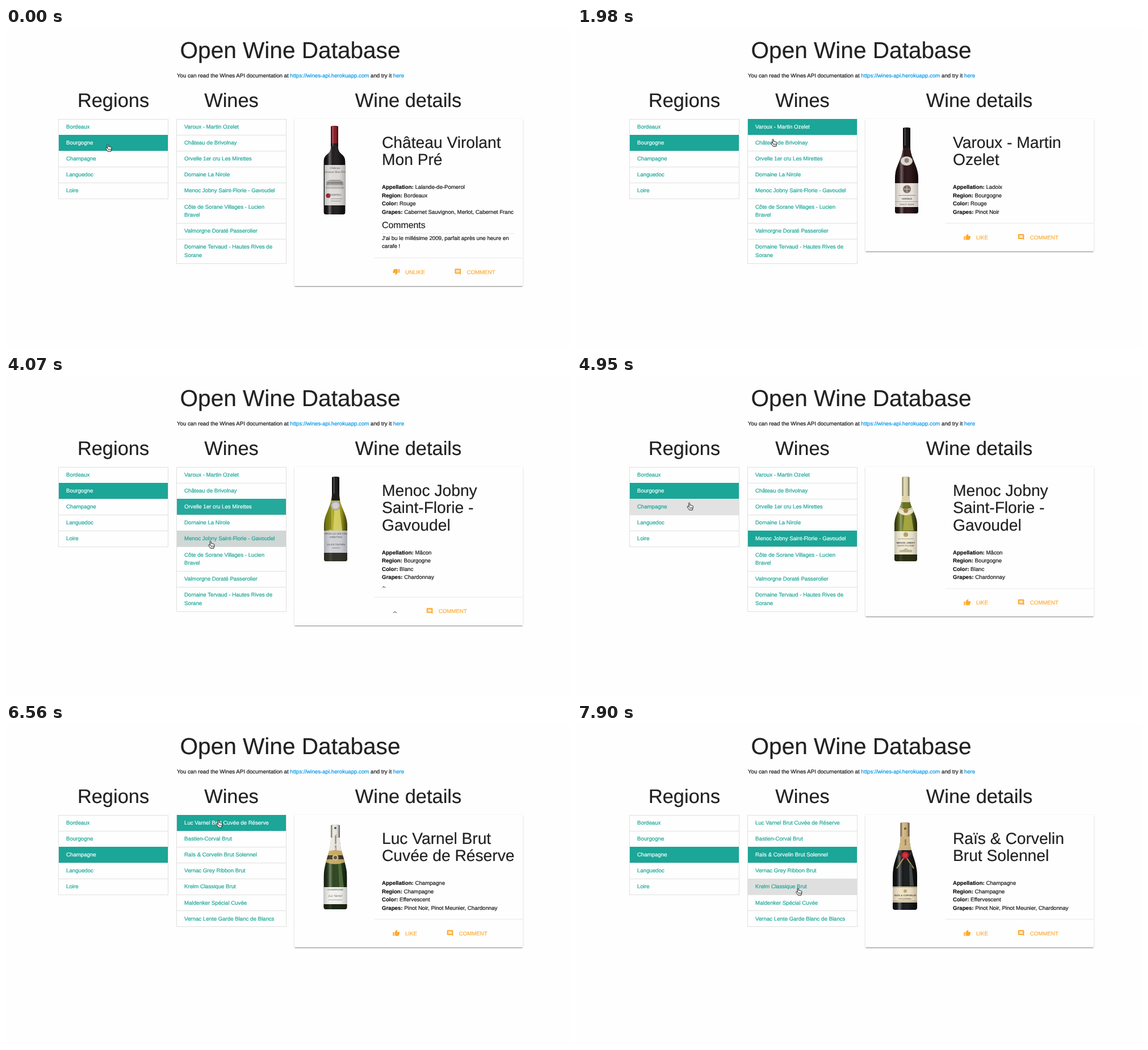
An HTML page for the animation above (8 s loop, 995 by 563 pixels).

```html
<!DOCTYPE html>
<html lang="en">
<head>
<meta charset="utf-8">
<title>Open Wine Database</title>
<style>
html, body { margin: 0; width: 100%; height: 100%; overflow: hidden; background: #fefefe; }
#card {
  position: absolute; left: 508px; top: 160px; width: 401.5px; border-radius: 1.3px; background: #fefefe;
  box-shadow: 0 1.3px 1.3px rgba(0,0,0,.16), 0 .7px 3.3px rgba(0,0,0,.14), 0 2px .7px -1.3px rgba(0,0,0,.22);
}
svg { position: absolute; left: 0; top: 0; }
text {
  font: 9.67px "Liberation Sans", Arial, sans-serif; text-rendering: geometricPrecision; color: #161616;
  fill: currentColor; stroke: currentColor; stroke-width: .2px;
}
.h1 { font-size: 40.6px; text-anchor: middle; }
.h2 { font-size: 34.4px; text-anchor: middle; }
.h3 { font-size: 28.2px; }
.h5 { font-size: 15.86px; }
.h1, .h2, .h3, .h5 { color: #212121; }
.teal { color: #1aa596; }
.white { color: #fff; }
.link { color: #0396e8; }
.amber { color: #ffa92f; }
.tiny { font-size: 4.4px; text-anchor: middle; stroke: none; color: #55504a; }
.script { font: italic 5.5px "Liberation Serif", serif; }
.b { font-weight: 700; }
</style>
</head>
<body>
<div id="card"></div>
<svg width="995" height="563" viewBox="0 0 995 563">
  <defs>
    <linearGradient id="sheen">
      <stop offset="0" stop-color="#000" stop-opacity=".6"/>
      <stop offset=".16" stop-color="#000" stop-opacity=".15"/>
      <stop offset=".27" stop-color="#fff" stop-opacity=".3"/>
      <stop offset=".4" stop-color="#fff" stop-opacity="0"/>
      <stop offset=".75" stop-color="#000" stop-opacity=".1"/>
      <stop offset="1" stop-color="#000" stop-opacity=".65"/>
    </linearGradient>
  </defs>
  <text class="h1" x="500.5" y="52.8">Open Wine Database</text>
  <text x="301" y="87.2">You can read the Wines API documentation at <tspan class="link">https://wines-api.herokuapp.com</tspan> and try it <tspan class="link">here</tspan></text>
  <text class="h2" x="189" y="138.6">Regions</text>
  <text class="h2" x="397" y="138.6">Wines</text>
  <text class="h2" x="708.5" y="138.6">Wine details</text>
  <g id="lists"></g>
  <g id="photo"></g>
  <g id="details"></g>
  <g id="hand" stroke="#111" stroke-width=".95" stroke-linejoin="round" stroke-linecap="round">
    <path fill="#fff" d="M-3-5.4C-3-6.9-1-6.9-.9-5.4L-.6-2C-.2-2.9 1-2.7 1.2-1.7 1.6-2.4 2.8-2.1 3-1.2 3.7-1.7 5-1.3 5 0L4.6 3 3.7 6.3H-1.6L-4.9 1.6C-6 .2-4.7-1-3.5 0L-2.4 1.1Z"/>
    <path fill="none" stroke-width=".7" d="M-.6 1.5V4M1.2 1.5V4M3 1.5V4"/>
  </g>
</svg>
<script>
const TEAL = '#1ba698', GREY = '#ddd', LINE = '#e0e0e0', ROW = 28.07;
const $ = id => document.getElementById(id);

const regions = ['Bordeaux', 'Bourgogne', 'Champagne', 'Languedoc', 'Loire'];
const cellars = [
  ['Varoux - Martin Ozelet', 'Château de Brivolnay', 'Orvelle 1er cru Les Mirettes', 'Domaine La Nirole',
   'Menoc Jobny Saint-Florie - Gavoudel', 'Côte de Sorane Villages - Lucien|Bravel',
   'Valmorgne Doraté Passerolier', 'Domaine Tervaud - Hautes Rives de|Sorane'],
  ['Luc Varnel Brut Cuvée de Réserve', 'Bastien-Corval Brut', 'Raïs & Corvelin Brut Solennel',
   'Vernac Grey Ribbon Brut', 'Krelm Classique Brut', 'Maldenker Spécial Cuvée',
   'Vernac Lente Garde Blanc de Blancs']
];

const wine = (title, Appellation, Region, Color, Grapes, note) => ({ title, facts: { Appellation, Region, Color, Grapes }, note });
const bubbly = title => wine(title, 'Champagne', 'Champagne', 'Effervescent', 'Pinot Noir, Pinot Meunier, Chardonnay');
const wines = [
  wine('Château Virolant|Mon Pré', 'Lalande-de-Pomerol', 'Bordeaux', 'Rouge', 'Cabernet Sauvignon, Merlot, Cabernet Franc',
    ["J'ai bu le millésime 2009, parfait après une heure en", 'carafe !']),
  wine('Varoux - Martin|Ozelet', 'Ladoix', 'Bourgogne', 'Rouge', 'Pinot Noir'),
  wine('Orvelle 1er cru|Les Mirettes', 'Chablis', 'Bourgogne', 'Blanc', 'Chardonnay'),
  wine('Menoc Jobny|Saint-Florie -|Gavoudel', 'Mâcon', 'Bourgogne', 'Blanc', 'Chardonnay'),
  bubbly('Luc Varnel Brut|Cuvée de Réserve'),
  bubbly('Raïs & Corvelin|Brut Solennel')
];

const safe = s => s.replace(/&/g, '&amp;');
const text = (x, y, s, cls = '') => `<text class="${cls}" x="${x}" y="${y}">${s}</text>`;
const rect = (x, y, w, h, fill, more = '') => `<rect x="${x}" y="${y}" width="${w}" height="${h}" fill="${fill}" ${more}/>`;
const disc = (x, y, r, fill, ry = r) => `<ellipse cx="${x}" cy="${y}" rx="${r}" ry="${ry}" fill="${fill}"/>`;
const path = (d, fill, more = '') => `<path d="${d}" fill="${fill}" ${more}/>`;

// Bottle outline: neck half-width n, body half-width w, shoulders between y1 and y2
function bottle(cx, n, w, top, y1, y2, end, glass, parts, curve = .4) {
  const k = (y2 - y1) * curve, l = cx - w, r = cx + w;
  const d = `M${cx - n} ${top + 1}Q${cx} ${top - 1} ${cx + n} ${top + 1}V${y1}C${cx + n} ${y1 + k} ${r} ${y2 - k} ${r} ${y2}V${end - 4}Q${r} ${end} ${r - 4} ${end}H${l + 4}Q${l} ${end} ${l} ${end - 4}V${y2}C${l} ${y2 - k} ${cx - n} ${y1 + k} ${cx - n} ${y1}Z`;
  const shade = o => rect(l, y1, 2 * w, end - y1, 'url(#sheen)', `opacity="${o}"`);
  return `<clipPath id="glass"><path d="${d}"/></clipPath><g clip-path="url(#glass)">` + path(d, glass) + shade(.9) + parts +
    rect(cx - n, top, 2 * n, y1 - top, 'url(#sheen)') + shade(.3) + '</g>';
}

const bottles = [
  () => bottle(578.5, 6.5, 19, 172, 208, 236, 328, '#211d20',
    rect(571, 172, 15, 31, '#8c1f2b') + rect(561, 241, 36, 71, '#dedcda') +
    text(579, 248, 'Château', 'tiny script') + text(579, 255, 'Virolant Mon Pré', 'tiny script') +
    path('M564 277V271L570 267H588L594 271V277Z', '#a4a19f') + rect(566, 272, 26, 1, '#555') +
    rect(563, 279, 32, 4, '#bbb8b5') + text(580, 295, 'POMEROL', 'tiny') +
    rect(572, 300, 20, .8, '#888') + rect(572, 304, 18, .8, '#888') + disc(567.5, 295, 4, '#9c2633'), .6),
  () => bottle(580.5, 6.5, 20.5, 175, 207, 264, 326.5, '#2c1718',
    rect(570, 175, 20, 36, '#171416') + disc(580.5, 234, 10.5, '#dcd6cc', 8) + disc(580.5, 233, 4, '#8d8780') +
    rect(560, 273, 41, 42, '#ebe6df') + disc(581, 283.5, 7, '#7f6d64') +
    path('M575 283.5H587M581 277.5V289.5', 'none', 'stroke="#d9cfc4"') +
    rect(566, 294, 30, .8, '#a58') + text(581, 302, 'VAROUX', 'tiny b') + rect(560, 305, 41, 1, '#c9a28e') +
    text(581, 311.5, 'PINOT NOIR', 'tiny')),
  () => bottle(580.5, 6.5, 20.5, 177, 207, 264, 326, '#aaa51f',
    path('M562 250Q572 225 573 205V270H562Z', '#7f800f') + path('M579 220H586L592 272H576Z', '#d3cf62') +
    rect(570, 176, 21, 43, '#1b1b1c') + disc(580.5, 228, 8.5, '#a9a9a6') + disc(580.5, 228, 6, '#d0d0ce') +
    rect(560, 272, 41, 39, '#ced0d6') + text(581, 279, 'ORVELLE 1ER CRU', 'tiny') + text(581, 285, 'MIRETTES', 'tiny') +
    text(581, 298, 'JULES TAVORN', 'tiny') + rect(574, 302, 14, .8, '#777') + rect(560, 311, 41, 15, '#33332b')),
  () => bottle(579, 6.5, 20, 177, 211, 262, 326, '#66711f',
    path('M577 240H588L593 272H574Z', '#a3a640') + rect(568, 176, 22, 46, '#ddd4aa') +
    path('M564 228Q579 240 594 228L592 240Q579 250 566 240Z', '#ece4cc') +
    path('M565 231Q579 242 593 231', 'none', 'stroke="#b69c4d" stroke-width="1"') + disc(579, 237, 4, '#a9854a') +
    rect(559, 273, 40, 41, '#eee8d3') + disc(579, 279, 4, '#b5a265') + rect(565, 286, 28, .7, '#8b846d') +
    text(579, 295, 'MENOC JOBNY', 'tiny b') + text(579, 300, 'SAINT-FLORIE', 'tiny') +
    path('M568 310V306H574L579 303 584 306H590V310Z', '#c1b694') + rect(559, 314, 40, 12, '#2c3012')),
  () => bottle(580, 8, 20.5, 177, 200, 270, 326, '#2e4521',
    path('M585 246H590L595 287H587Z', '#4f6b3a') + rect(566, 176, 28, 52, '#e9e7e0') +
    `<g transform="rotate(-90 580 208)">${text(580, 210, 'LUC VARNEL', 'tiny b')}</g>` + disc(580, 183, 2, '#555') +
    path('M562 226Q580 218 598 226V243Q580 250 562 243Z', '#c7ab66') + rect(562, 231, 36, 7, '#39382c') +
    disc(580, 235, 5.5, '#d3bd82') + disc(580, 235, 3, '#665638') +
    rect(559, 287, 42, 31, '#f1f1ed') + text(580, 293, 'CHAMPAGNE', 'tiny') + text(580, 304, 'Luc Varnel', 'tiny script') +
    rect(568, 309, 24, .7, '#888') + rect(559, 317, 42, 9, '#1c2616')),
  () => bottle(577.5, 8, 21.5, 173, 198, 267, 327, '#171b1b',
    rect(565, 172, 26, 50, '#cfb381') + `<g transform="rotate(-90 578 208)">${text(578, 210, 'RAÏS', 'tiny b')}</g>` +
    disc(578, 184, 2, '#6d5527') +
    path('M566 223Q578 234 590 222L592 228Q578 238 564 229Z', '#2a2a28') +
    path('M563 254L578 232 593 254', 'none', 'stroke="#b99a55" stroke-width="2"') + disc(578, 231, 6.5, '#b31c2b') +
    disc(578, 231, 4, '#cf3340') + path('M585 247H589L593 285H586Z', '#454b49') +
    rect(556, 286, 43, 28, '#eee3c5') + rect(556, 287, 43, 1, '#bda05e') + rect(556, 311, 43, 1.2, '#bda05e') +
    disc(578, 294, 3, '#c4a76a') + text(578, 303, 'RAÏS &amp; CORVELIN', 'tiny b') + text(578, 309, 'SOLENNEL', 'tiny'))
];

const THUMB = 'M1 21h4V9H1v12zm22-11c0-1.1-.9-2-2-2h-6.31l.95-4.57.03-.32c0-.41-.17-.79-.44-1.06L14.17 1 7.59 7.59C7.22 7.95 7 8.45 7 9v10c0 1.1.9 2 2 2h9c.83 0 1.54-.5 1.84-1.22l3.02-7.05c.09-.23.14-.47.14-.73v-2z';
const BUBBLE = 'M20 2H4c-1.1 0-2 .9-2 2v12c0 1.1.9 2 2 2h14l4 4V4c0-1.1-.9-2-2-2zm-2 12H6v-2h12v2zm0-3H6V9h12v2zm0-3H6V6h12v2z';
const icon = (d, x, y, turn = 0) => path(d, '#ffa92f', `transform="translate(${x} ${y}) scale(.535) rotate(${turn} 12 12)"`);
const dots = (x, y) => disc(x - 2.5, y + .5, .6, '#222') + disc(x, y - .5, .9, '#111') + disc(x + 2.5, y + .5, .7, '#222');

// Borders and fills sit on whole pixels; a coloured row covers its upper border
function list(x, names, fills, picked) {
  let y = 160, lines = '', rows = '', words = '';
  names.forEach((name, i) => {
    const parts = name.split('|'), next = y + ROW + 14.5 * (parts.length - 1), top = Math.round(y);
    lines += rect(x, top, 192, 1, LINE);
    if (fills[i]) rows += rect(x, top, 192, Math.round(next) - top, fills[i]);
    parts.forEach((s, j) => words += text(x + 13.1, y + 17.2 + 14.5 * j, safe(s), i === picked ? 'white' : 'teal'));
    y = next;
  });
  const end = Math.round(y);
  lines += rect(x, end, 192, 1, LINE) + rect(x - 1, 160, 1, end - 159, LINE) + rect(x + 192, 160, 1, end - 159, LINE);
  return lines + rows + words;
}

function details({ title, facts, note }, loading) {
  const lines = title.split('|'), d = 30.5 * (lines.length - 2);
  let out = '', y = 283.2 + d, edge = 343.5 + d;
  lines.forEach((s, i) => out += text(662, 210.6 + 30.5 * i, safe(s), 'h3'));
  for (const key in facts) {
    out += text(662, y, `<tspan class="b">${key}:</tspan> ${facts[key]}`);
    y += 14.45;
  }
  if (loading) {
    out += dots(665.3, 341 + d);
    edge += 15.2;
  } else if (note) {
    out += text(662, 352, 'Comments', 'h5') + rect(661.5, 361.5, 234.5, .7, LINE);
    note.forEach((s, i) => out += text(662, 373 + 14.4 * i, s));
    edge = 404.5;
  }
  const base = edge + 28, top = edge + 18;
  const chat = loading ? 739.6 : note ? 789.3 : 775.6;
  out += rect(649, edge - .3, 260.5, .7, LINE);
  out += loading ? dots(685, edge + 26.5)
    : icon(THUMB, 680.8, top, note ? 180 : 0) + text(703, base, note ? 'UNLIKE' : 'LIKE', 'amber');
  out += icon(BUBBLE, chat, top) + text(chat + 22.2, base, 'COMMENT', 'amber');
  $('card').style.height = edge + 49.3 - 160 + 'px';
  return out;
}

// Timeline: each step overrides parts of the state before it
const steps = [];
const at = (t, x, y, more) => steps.push({ t, x, y, ...more });
function choose(t, dt, x, y, old, next, show) {
  at(t, x, y, { fills: { [old]: '#25a99c', [next]: '#d0d7d5' }, show, loading: true });
  at(t + dt, x, y, { fills: { [old]: '#e4f4f2', [next]: '#2bab9e' }, picked: next, photo: show });
  at(t + 2 * dt, x, y, { fills: { [next]: TEAL }, loading: false });
}
const hover = (picked, i, c = GREY) => ({ fills: { [i]: c, [picked]: TEAL } });

at(0, 181, 211, { region: { 1: TEAL }, home: 1, cellar: 0, fills: {}, picked: -1, show: 0, photo: 0, loading: false });
at(450, 205, 209);
at(617, 268, 199);
at(783, 324, 190, { fills: { 0: '#eee' } });
at(950, 341, 189, { fills: { 0: GREY } });
choose(1390, 150, 341, 189, -1, 0, 1);
at(1980, 347, 202);
at(2130, 352, 217, hover(0, 1, '#e2e2e2'));
at(2280, 356, 233, hover(0, 2, '#e6e6e6'));
at(2430, 357, 238.5, hover(0, 2));
choose(2730, 150, 357, 238.5, 0, 2, 2);
at(3320, 358, 253, hover(2, 3, '#eee'));
at(3470, 361, 284, hover(2, 4, '#e8e8e8'));
at(3620, 362, 297, hover(2, 4));
choose(4070, 147, 362, 297, 2, 4, 3);
at(4510, 345, 290);
at(4657, 285, 262);
at(4803, 222, 238, { region: { 1: TEAL, 2: '#f0f0f0' } });
at(4950, 199.5, 229.5, { region: { 1: TEAL, 2: '#e2e2e2' } });
at(5250, 199.5, 229.5, { region: { 1: '#25a99c', 2: '#d0d7d5' } });
at(5394, 199.5, 229.5, { region: { 1: '#e4f4f2', 2: '#2bab9e' }, home: 2, cellar: 1, fills: {}, picked: -1 });
at(5538, 216, 226, { region: { 2: TEAL } });
at(5682, 290, 203);
at(5826, 360, 180, { fills: { 0: '#eee' } });
at(5970, 376, 176, { fills: { 0: '#dadada' } });
choose(6270, 145, 376, 176, -1, 0, 4);
at(6705, 385, 222, hover(0, 1, '#eee'));
at(6850, 389.5, 244.5, hover(0, 2));
choose(7300, 150, 389.5, 244.5, 0, 2, 5);
at(7750, 390, 268, hover(2, 3, '#eee'));
at(7900, 391, 295, hover(2, 4, '#dfdfdf'));
steps.forEach((s, i) => steps[i] = { ...steps[i - 1], ...s });

let shown = -1;
function draw() {
  const t = performance.now() % 8000;
  const n = steps.findLastIndex(s => s.t <= t);
  if (n !== shown) {
    const s = steps[shown = n];
    $('lists').innerHTML = list(93, regions, s.region, s.home) + list(301, cellars[s.cellar], s.fills, s.picked);
    $('photo').innerHTML = bottles[s.photo]();
    $('details').innerHTML = details(wines[s.show], s.loading);
    $('hand').setAttribute('transform', `translate(${s.x} ${s.y})`);
  }
  requestAnimationFrame(draw);
}
draw();
</script>
</body>
</html>
```
